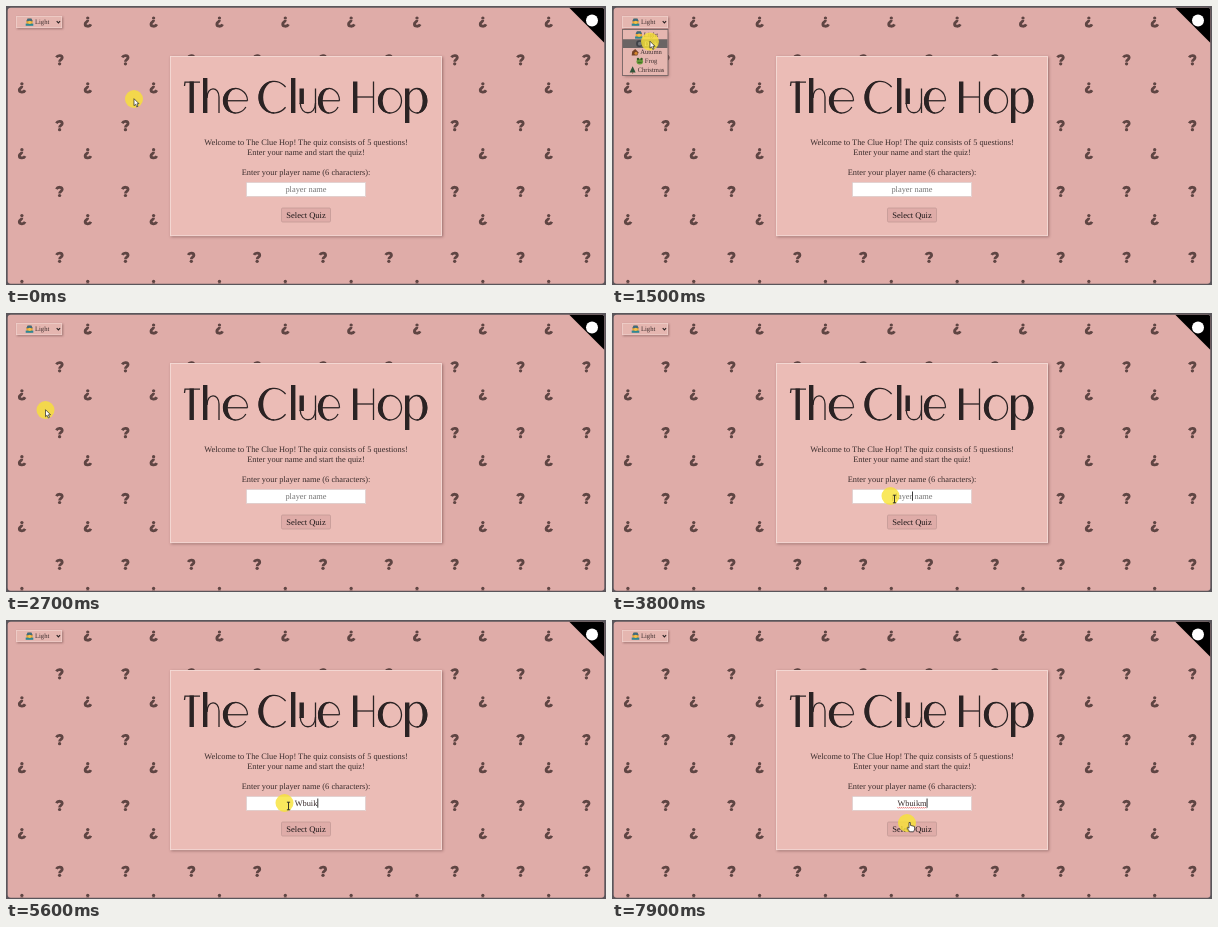
These frames come from a looping animation (600 px wide and 279 px high, 8000 ms). An HTML page with a canvas:

```html
<!DOCTYPE html>
<html lang="en">
<head>
<meta charset="utf-8">
<title>The Clue Hop</title>
<style>
html, body { margin: 0; width: 100%; height: 100%; overflow: hidden; background: #555156; }
canvas { display: block; width: 600px; height: 279px; }
</style>
</head>
<body>
<canvas id="stage" role="img" aria-label="The Clue Hop"></canvas>
<script>
const W = 600, H = 279, LOOP = 8000;
const canvas = document.getElementById('stage');
const ctx = canvas.getContext('2d');
const dpr = window.devicePixelRatio || 1;
canvas.width = W * dpr;
canvas.height = H * dpr;

const SERIF = '"Liberation Serif", "Times New Roman", serif';
const INK = '#3a2c2c', PINK = '#dfaca8', CARD = '#ebbcb6';
const MARK = '#5f4543', TITLE = '#2b2324';
const PLAYER = 'Wbuikm';
const KEYS = [4300, 4700, 5000, 5200, 5600, 6900];
const FOCUS = 3800, OPEN = 1200, CLOSE = 2500, SPELL = 7200;
const THEMES = ['Light', 'Dark', 'Autumn', 'Frog', 'Christmas'];

// pointer stops: time, x, y
const STOPS = [
  [0, 128, 93], [900, 39, 18], [1300, 39, 18], [1900, 35, 85], [2300, 37, 92],
  [2700, 39.5, 97], [3600, 278.5, 183], [7500, 278.5, 183], [7900, 295, 203]
];

function rect(x, y, w, h, color) {
  ctx.fillStyle = color;
  ctx.fillRect(x, y, w, h);
}

function frame(x, y, w, h, color, width = 1) {
  ctx.strokeStyle = color;
  ctx.lineWidth = width;
  ctx.strokeRect(x, y, w, h);
}

function shadowed(blur, dx, dy, draw) {
  ctx.save();
  ctx.shadowColor = 'rgba(70,35,35,.45)';
  ctx.shadowBlur = blur * dpr;
  ctx.shadowOffsetX = dx * dpr;
  ctx.shadowOffsetY = dy * dpr;
  draw();
  ctx.restore();
}

function text(str, x, y, size = 8.35, color = INK, align = 'center') {
  ctx.font = `${size}px ${SERIF}`;
  ctx.textRendering = 'geometricPrecision';
  ctx.textAlign = align;
  ctx.fillStyle = color;
  ctx.fillText(str, x, y);
  return ctx.measureText(str).width;
}

function disc(x, y, rx, ry, color) {
  ctx.fillStyle = color;
  ctx.beginPath();
  ctx.ellipse(x, y, rx, ry, 0, 0, 7);
  ctx.fill();
}

function poly(points, color) {
  ctx.fillStyle = color;
  ctx.beginPath();
  points.forEach(([x, y]) => ctx.lineTo(x, y));
  ctx.closePath();
  ctx.fill();
}

function questionMark(x, y, flipped) {
  ctx.save();
  ctx.translate(x, y);
  if (flipped) ctx.rotate(Math.PI);
  ctx.strokeStyle = MARK;
  ctx.lineWidth = 2.8;
  ctx.beginPath();
  ctx.moveTo(-3.3, -2.4);
  ctx.bezierCurveTo(-2, -5, 2.6, -4.8, 2.5, -2);
  ctx.bezierCurveTo(2.4, -.2, -.1, -.2, -.1, 1.9);
  ctx.stroke();
  disc(-.1, 4, 1.65, 1.6, MARK);
  ctx.restore();
}

function background() {
  rect(0, 0, W, H, '#5a565b');
  ctx.save();
  ctx.beginPath();
  ctx.roundRect(1.7, 1.7, 596.6, 276, 3);
  ctx.clip();
  rect(0, 0, W, H, PINK);
  const step = 65.85;
  for (let r = 0; r < 5; r++) {
    for (let c = 0; c < 9; c++) {
      questionMark(15.8 + c * step, 16 + r * step, true);
      questionMark(53.7 + c * step, 53.8 + r * step, false);
    }
  }
  poly([[563, 1.5], [598.5, 1.5], [598.5, 37]], '#000');
  disc(586, 14.5, 6, 6, '#fff');
  ctx.restore();
}

// display lettering: heavy stems, hairlines, and one-sided heavy bowls
const BASE = 107, CAP = 75.5, XH = 82.5;
const MID = (XH + BASE) / 2, HALF = (BASE - XH) / 2;

function stem(x, top, bottom = BASE, w = 4.4) {
  rect(x, top, w, bottom - top, TITLE);
}

function hair(...points) {
  ctx.beginPath();
  points.forEach(([x, y]) => ctx.lineTo(x, y));
  ctx.stroke();
}

function bowl(cx, cy, rx, ry, { from = 0, to = Math.PI * 2, side = -1 } = {}) {
  const q = Math.PI / 2, left = side < 0;
  ctx.beginPath();
  ctx.ellipse(cx, cy, rx, ry, 0, from, to);
  ctx.stroke();
  ctx.fillStyle = TITLE;
  ctx.beginPath();
  ctx.ellipse(cx, cy, rx + .5, ry + .5, 0, -q, q, left);
  ctx.ellipse(cx, cy, rx - 4.2, ry - .7, 0, q, -q, !left);
  ctx.fill();
}

function letterE(cx, rx) {
  bowl(cx, MID, rx, HALF, { from: Math.PI * .17 });
  hair([cx - rx, MID], [cx + rx, MID]);
}

function title() {
  ctx.strokeStyle = TITLE;
  ctx.lineWidth = 1.3;
  // T
  hair([178.5, 80], [179, CAP + .6], [194, CAP + .6]);
  stem(183.5, CAP);
  // h
  stem(197, 72);
  ctx.beginPath();
  ctx.moveTo(201, 92);
  ctx.bezierCurveTo(201, 80, 213, 80, 213, 91);
  ctx.lineTo(213, BASE);
  ctx.stroke();
  letterE(229.5, 12);
  // C
  bowl(268, 91.2, 15, 15.8, { from: Math.PI * .22, to: Math.PI * 1.78 });
  // l
  stem(285, 72);
  // u
  stem(293.5, XH, 98);
  ctx.beginPath();
  ctx.moveTo(294.2, 97);
  ctx.bezierCurveTo(294.5, 110, 309.5, 110, 309.5, 97);
  ctx.stroke();
  hair([309.5, XH], [309.5, BASE]);
  letterE(323, 10.5);
  // H
  stem(347, CAP);
  hair([351, 91], [367.5, 91]);
  hair([367.5, CAP], [367.5, BASE]);
  // o
  bowl(384, MID, 11.5, HALF);
  // p
  stem(399, XH, 117);
  bowl(411, MID, 9.8, HALF, { side: 1 });
}

function icon(kind, x, y) {
  if (kind === 'Light') {
    disc(x, y, 3.2, 3.6, '#e9a435');
    poly([[x - 3.2, y - .8], [x - 2, y - 3.6], [x + 2, y - 3.6], [x + 3.2, y - .8]], '#3f6a80');
    rect(x - 3.8, y + 1.6, 7.6, 2.2, '#2f8794');
    disc(x + .2, y + .3, 1.6, 1.6, '#f3c04a');
  } else if (kind === 'Dark') {
    disc(x, y, 3.3, 3.3, '#3f4147');
    disc(x + .4, y, 1.9, 1.9, '#74767b');
  } else if (kind === 'Autumn') {
    poly([[x - 3.5, y + 3], [x - 3, y - 1], [x, y - 3.4], [x + 3.5, y], [x + 2, y + 3]], '#754126');
    disc(x + .8, y + .8, 1.5, 1.5, '#d8872d');
  } else if (kind === 'Frog') {
    disc(x, y + .4, 3.3, 2.9, '#679a39');
    disc(x - 1.8, y - 2.1, 1.2, 1.2, '#385a26');
    disc(x + 1.8, y - 2.1, 1.2, 1.2, '#385a26');
    rect(x - 2, y + .8, 4, .8, '#385a26');
  } else {
    poly([[x, y - 3.7], [x + 3, y + 2.6], [x - 3, y + 2.6]], '#31543a');
    rect(x - .5, y + 2.5, 1, 1.2, '#785036');
  }
}

function themeMenu(t, pointerY) {
  shadowed(2, .8, .8, () => rect(10, 10, 46, 12, '#e5b6b0'));
  frame(10.5, 10.5, 45.2, 11.2, '#efcfca', .8);
  icon('Light', 23.5, 16);
  text('Light', 29, 18.2, 6.6, INK, 'left');
  ctx.strokeStyle = TITLE;
  ctx.lineWidth = 1.1;
  hair([50.7, 15.2], [52.4, 17], [54.1, 15.2]);
  if (t < OPEN || t >= CLOSE) return;

  shadowed(3, 1, 1, () => rect(10.5, 23.5, 45.5, 46, '#e5b6b0'));
  const row = 8.75, first = 24.5;
  const hot = Math.min(4, Math.max(0, Math.floor((pointerY - first) / row)));
  rect(11, first + hot * row, 44.5, row, '#6a6464');
  THEMES.forEach((name, i) => {
    const y = first + (i + .5) * row;
    const w = text(name, 39, y + 2.1, 6.6, i === hot ? '#fff' : INK);
    icon(name, 39 - w / 2 - 5, y);
  });
  frame(10.5, 23.5, 45.5, 46, '#766565', .9);
}

function squiggle(x0, x1, y) {
  ctx.strokeStyle = '#e04545';
  ctx.lineWidth = .7;
  ctx.beginPath();
  for (let x = x0, i = 0; x <= x1; x++, i++) ctx.lineTo(x, y + (i % 2 ? .5 : -.5));
  ctx.stroke();
}

function nameField(t) {
  rect(240, 176, 120, 14.7, '#fff');
  frame(240.4, 176.4, 119.2, 14, '#dcc7c6', .8);
  const typed = KEYS.filter(k => k <= t);
  let end = 300;
  if (typed.length) {
    const w = text(PLAYER.slice(0, typed.length), 300, 186);
    end += w / 2;
    if (t >= SPELL) squiggle(300 - w / 2, end, 187.8);
  } else {
    text('player name', 300, 186, 8.4, '#757575');
  }
  const since = t - (typed.length ? typed[typed.length - 1] : FOCUS);
  if (since >= 0 && since % 1000 < 500) rect(end, 178.5, .9, 9.2, '#222');
}

function card(t) {
  shadowed(2.5, 1.2, 1.2, () => rect(164, 50, 272, 180, CARD));
  frame(164.5, 50.5, 271, 179.2, '#f4dad6', .9);
  title();
  text('Welcome to The Clue Hop! The quiz consists of 5 questions!', 300, 139);
  text('Enter your name and start the quiz!', 300, 148.8);
  text('Enter your player name (6 characters):', 300, 169.3);
  nameField(t);
  ctx.beginPath();
  ctx.roundRect(275.5, 202, 49, 14, 1.2);
  ctx.fillStyle = PINK;
  ctx.fill();
  ctx.strokeStyle = '#c39a96';
  ctx.lineWidth = .8;
  ctx.stroke();
  text('Select Quiz', 300, 211.8, 8.5, '#1d1718');
}

function pointerAt(t) {
  const i = STOPS.findIndex(s => s[0] > t);
  if (i < 0) return STOPS[STOPS.length - 1].slice(1);
  const [t0, x0, y0] = STOPS[i - 1], [t1, x1, y1] = STOPS[i];
  const u = (t - t0) / (t1 - t0), k = u * u * (3 - 2 * u);
  return [x0 + (x1 - x0) * k, y0 + (y1 - y0) * k];
}

function outlined(points) {
  poly(points, '#fff');
  ctx.strokeStyle = '#222';
  ctx.lineWidth = .7;
  ctx.stroke();
}

function pointer(x, y) {
  const inside = (l, t, r, b) => x > l && x < r && y > t && y < b;
  disc(x, y, 9, 9, 'rgba(248,226,52,.8)');
  ctx.save();
  if (inside(240, 176, 360, 191)) {
    ctx.translate(x + 4, y + 3);
    ctx.strokeStyle = '#222';
    ctx.lineWidth = .9;
    hair([-1.6, -3.8], [1.6, -3.8]);
    hair([0, -3.8], [0, 3.8]);
    hair([-1.6, 3.8], [1.6, 3.8]);
  } else if (inside(275, 202, 325, 217)) {
    ctx.translate(x + 2, y - 1);
    outlined([[0, .5], [1.3, .5], [1.5, 3.4], [5.4, 4.4], [5.7, 7], [4.6, 9.8], [.8, 9.8], [-2, 6], [-1.4, 5.2], [0, 6.2]]);
  } else {
    ctx.translate(x, y - .3);
    outlined([[0, 0], [0, 7], [1.6, 5.6], [2.8, 8.2], [4, 7.6], [2.9, 5.1], [5, 5]]);
  }
  ctx.restore();
}

function draw(t) {
  ctx.setTransform(dpr, 0, 0, dpr, 0, 0);
  const [x, y] = pointerAt(t);
  background();
  card(t);
  themeMenu(t, y);
  pointer(x, y);
}

const start = performance.now();
function tick() {
  draw((performance.now() - start) % LOOP);
  requestAnimationFrame(tick);
}
tick();
</script>
</body>
</html>
```
